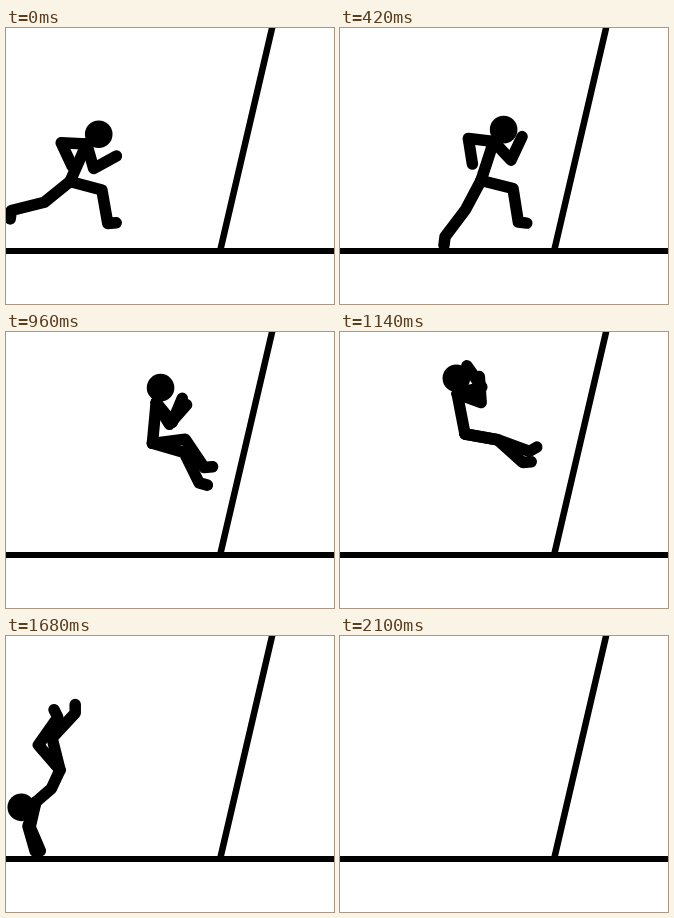
An HTML page with a canvas for the animation above (2.16 s loop, 328 by 276 pixels).

```html
<!DOCTYPE html>
<html lang="en">
<head>
<meta charset="utf-8">
<title>Wall flip</title>
<style>
html, body { margin: 0; width: 100%; height: 100%; overflow: hidden; background: #fff; }
canvas { display: block; }
</style>
</head>
<body>
<canvas id="stage" width="328" height="276"></canvas>
<script>
const ctx = document.getElementById('stage').getContext('2d');
const STEP = 60, LOOP = 2160;
const SPINE = [20.5, 20.5, 15.5], ARM = [25.5, 26], LEG = [33, 34, 8.5];

// Key poses: hip position, then absolute bone angles in degrees (0 = right, 90 = down).
const running = { hip: [64, 153.5], spine: [-66, -66, -39],
  armA: [183, 65], armB: [74, -29], legA: [15, 80, -5], legB: [141, 166, 98] };
const takeoff = { hip: [141, 152.5], spine: [-72, -72, -50],
  armA: [47, -65], armB: [187, 81], legA: [118, 127, 97], legB: [14, 81, 7] };
const crouch = { hip: [175, 142], spine: [-63, -63, -48],
  armA: [92, -32], armB: [157, 53], legA: [24, 122, 75], legB: [-30, 75, -5] };
const tuck = { hip: [125, 102], spine: [-101, -101, -93],
  armA: [20, -94], armB: [-15, -125], legA: [10, 20, -30], legB: [10, 42, -5] };
const landing = { hip: [76, 141], spine: [-233, -221, -212],
  armA: [-218, -268], armB: [-227, -279], legA: [-99, -22, -70], legB: [-70, -14, -67] };
const handstand = { hip: [54, 134], spine: [-245, -221, -200],
  armA: [-252, -286], armB: [-257, -293], legA: [-131, -55, -117], legB: [-104, -47, -90] };
const gone = turned(handstand, -85, [-95, 134]);

// lift: height of the hop, bend: extra flex of the swinging shin, ease: timing curve
const linear = k => k, easeIn = k => k * k, easeOut = k => 1 - (1 - k) ** 1.5;
const moves = [
  { from: running, to: takeoff, start: 60, end: 420, lift: 0, bend: 45, ease: linear },
  { from: takeoff, to: crouch, start: 420, end: 660, lift: 16, bend: 0, ease: easeOut },
  { from: crouch, to: tuck, start: 720, end: 1140, lift: 8, bend: 0, ease: linear },
  { from: tuck, to: landing, start: 1140, end: 1440, lift: 10, bend: 0, ease: linear },
  { from: landing, to: handstand, start: 1440, end: 1680, lift: 0, bend: 0, ease: linear },
  { from: handstand, to: gone, start: 1680, end: 2100, lift: 10, bend: 0, ease: easeIn }
];

function turned(pose, angle, hip) {
  const result = {};
  for (const part in pose) result[part] = pose[part].map(a => a + angle);
  return { ...result, hip };
}

function poseAt(time) {
  const move = moves.find(m => time < m.end) || moves.at(-1);
  const { from, to, start, end, lift, bend, ease } = move;
  const k = Math.min(1, Math.max(0, (time - start) / (end - start)));
  const arc = Math.sin(Math.PI * k), pose = {};
  for (const part in from)
    pose[part] = from[part].map((v, i) => v + (to[part][i] - v) * ease(k));
  pose.hip[1] -= lift * arc;
  pose.legB[1] += bend * arc;
  return pose;
}

function chain(start, lengths, angles) {
  const points = [start];
  angles.forEach((deg, i) => {
    const [x, y] = points[i], r = deg * Math.PI / 180;
    points.push([x + lengths[i] * Math.cos(r), y + lengths[i] * Math.sin(r)]);
  });
  return points;
}

function line(points, width) {
  ctx.lineWidth = width;
  ctx.beginPath();
  points.forEach(p => ctx.lineTo(...p));
  ctx.stroke();
}

function drawFigure(pose) {
  const back = chain(pose.hip, SPINE, pose.spine);
  const [, , shoulder, head] = back;
  line(back.slice(0, 3), 11.5);
  for (const arm of [pose.armA, pose.armB]) line(chain(shoulder, ARM, arm), 11.5);
  for (const leg of [pose.legA, pose.legB]) line(chain(pose.hip, LEG, leg), 11.5);
  ctx.beginPath();
  ctx.arc(...head, 13.8, 0, 2 * Math.PI);
  ctx.fill();
}

function draw() {
  const time = Math.floor(performance.now() % LOOP / STEP) * STEP;
  ctx.fillStyle = '#fff';
  ctx.fillRect(0, 0, 328, 276);
  ctx.fillStyle = ctx.strokeStyle = '#000';
  ctx.lineCap = ctx.lineJoin = 'round';
  ctx.save();
  ctx.beginPath();
  ctx.rect(0, 0, 328, 222);
  ctx.clip();
  line([[267, -4], [214.8, 220]], 6.5);
  drawFigure(poseAt(time));
  ctx.restore();
  ctx.fillRect(0, 220, 328, 6);
  requestAnimationFrame(draw);
}
draw();
</script>
</body>
</html>
```
